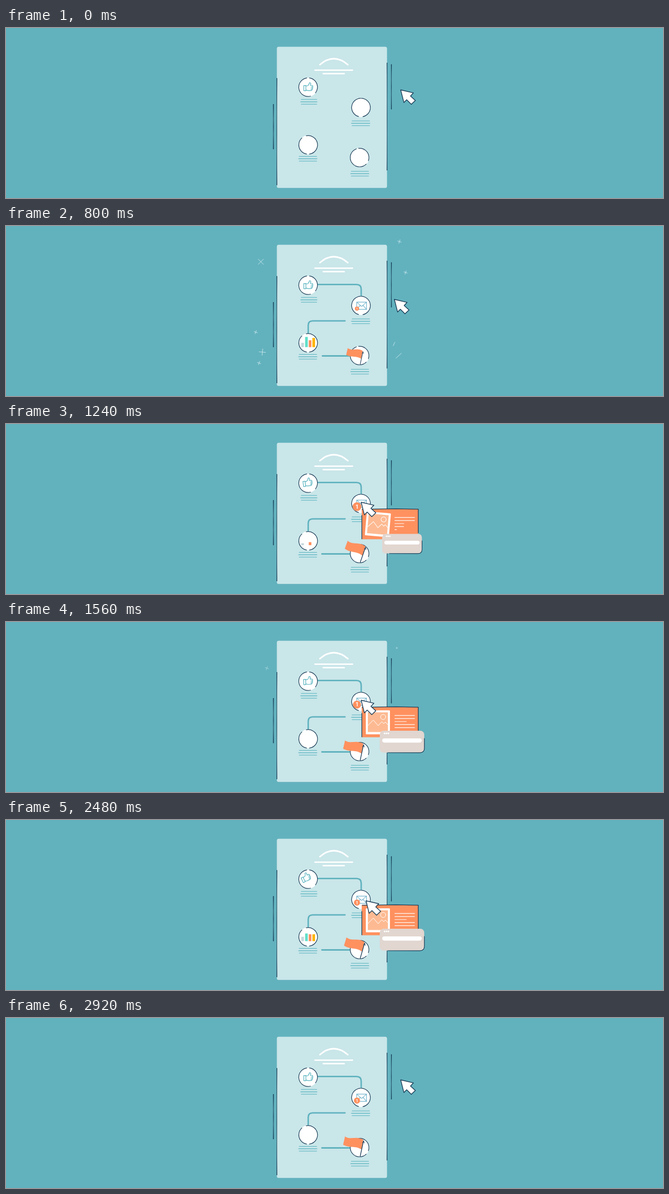
These frames come from a looping animation (1280x333 px, 3.32 s). An HTML page with a canvas:

```html
<!DOCTYPE html>
<html lang="en">
<head>
<meta charset="utf-8">
<title>Customer journey</title>
<style>
html, body { margin: 0; width: 100%; height: 100%; overflow: hidden; background: #62b2be; }
canvas { display: block; width: 100vw; height: 100vh; }
</style>
</head>
<body>
<canvas id="stage" width="1280" height="333"></canvas>
<script>
const canvas = document.getElementById('stage');
const ctx = canvas.getContext('2d');
const LOOP = 3320, STEP = 40, REST = 2920, CYCLE = 1240;
const BG = '#62b2be', PAPER = '#c9e6e9', NAVY = '#173a54', TEAL = '#52b0bd';
const ORANGE = '#ff915f', PEACH = '#fdba92', SAND = '#e1d6d0', WHITE = '#fff';

const clamp = v => Math.max(0, Math.min(1, v));
const prog = (t, start, dur) => clamp((t - start) / dur);
const smooth = p => p * p * (3 - 2 * p);
const easeOut = p => 1 - (1 - p) ** 3;
const backOut = p => p <= 0 ? 0 : 1 + 2.7 * (p - 1) ** 3 + 1.7 * (p - 1) ** 2;
const rad = deg => deg * Math.PI / 180;

// Smoothed interpolation through [time, value] pairs.
function keys(t, list) {
  if (t <= list[0][0]) return list[0][1];
  for (let i = 1; i < list.length; i++) {
    const [t0, v0] = list[i - 1], [t1, v1] = list[i];
    if (t < t1) return v0 + (v1 - v0) * smooth((t - t0) / (t1 - t0));
  }
  return list[list.length - 1][1];
}

function stroke(path, color, width) {
  ctx.strokeStyle = color;
  ctx.lineWidth = width;
  ctx.stroke(new Path2D(path));
}

function fill(path, color) {
  ctx.fillStyle = color;
  ctx.fill(new Path2D(path));
}

function box(x, y, w, h, r, color) {
  ctx.beginPath();
  ctx.roundRect(x, y, w, h, r);
  ctx.fillStyle = color;
  ctx.fill();
}

function disc(x, y, r, color) {
  ctx.beginPath();
  ctx.arc(x, y, r, 0, 7);
  ctx.fillStyle = color;
  ctx.fill();
}

// Runs draw() scaled and turned around a pivot.
function around(x, y, scale, deg, draw) {
  if (scale <= 0) return;
  ctx.save();
  ctx.translate(x, y);
  ctx.rotate(rad(deg));
  ctx.scale(scale, scale);
  ctx.translate(-x, -y);
  draw();
  ctx.restore();
}

function taper(x, y0, y1, w) {
  const mid = (y0 + y1) / 2;
  fill(`M${x - w / 2} ${y0}Q${x + w} ${mid} ${x - w / 2} ${y1}L${x + w / 2} ${y1}Q${x - w} ${mid} ${x + w / 2} ${y0}Z`, NAVY);
  stroke(`M${x} ${y0 + 1}V${y1 - 1}`, NAVY, w * .75);
}

// x, y, radius, angle, kind (2 = cross, 1 = dash), delay
const sparks = [
  [496.5, 70, 7.2, 45, 2, 0], [766.5, 30.5, 3.6, 20, 2, 0],
  [499.5, 247, 6.3, 5, 2, 80], [778.5, 91, 3.5, 20, 2, 140],
  [486.5, 208, 3.5, 20, 2, 140], [493, 268.5, 3.5, 20, 2, 180],
  [756, 231, 3.6, 115, 1, 140], [765, 254, 7, 138, 1, 100]
];

function drawSparks(t) {
  if (t >= REST) return;
  const u = t % CYCLE;
  for (const [x, y, r, angle, kind, delay] of sparks) {
    const p = prog(u, 280 + delay, 400);
    const fade = 1 - smooth(prog(u, 880 + delay / 2, 220));
    if (!p || !fade) continue;
    const back = 1 - easeOut(p);
    const side = x < 640 ? 1 : -1, upper = y < 170;
    const cx = x + side * (upper && x > 640 ? 7 : 16) * back;
    const cy = y + (upper ? 28 : -20) * back;
    const size = r * (.3 + .7 * (1 - back)) * (.4 + .6 * fade);
    ctx.globalAlpha = .75 * fade * clamp(p * 6);
    for (let i = 0; i < kind; i++) {
      const a = rad(angle - 35 * back + i * 90);
      const dx = size * Math.cos(a), dy = size * Math.sin(a);
      stroke(`M${cx - dx} ${cy - dy}L${cx + dx} ${cy + dy}`, '#e4f5f6', 1);
    }
  }
  ctx.globalAlpha = 1;
}

function drawPaper() {
  box(527.7, 36.8, 214.6, 276.5, 3.5, PAPER);
  taper(527.7, 98, 308, 1.2);
  taper(742.4, 68, 279, 1.2);
  taper(521, 149, 237.5, 1.2);
  taper(750.8, 71, 159.5, 1.2);
  stroke('M611.5 71.8Q638.5 48.5 666 71.8', WHITE, 3);
  stroke('M602 82.6H675', WHITE, 2.8);
  stroke('M618 89.4H659', WHITE, 2.6);
  for (const [x, y, w] of [[574, 140, 32], [673, 182, 36], [570, 251.5, 36], [671.5, 280.8, 35.5]])
    for (let i = 0; i < 3; i++) {
      const inset = i == 1 ? 0 : 1.2;
      stroke(`M${x + inset} ${y + i * 4.6}h${w - inset * 1.5}`, TEAL, 1.1);
    }
}

function drawLink(path, length, p) {
  if (!p) return;
  ctx.setLineDash([length * p, length + 5]);
  stroke(path, '#5fb2be', 2.8);
  ctx.setLineDash([]);
}

// x, y, then arcs of outline as from-to degrees
const spots = [
  [588.6, 115.9, 75, 262, -82, 38], [691.6, 155.8, 105, 268, -88, 78],
  [588.7, 228.9, 100, 228, -102, 82], [688.9, 253.8, 45, 250, -96, 20]
];

function drawSpots() {
  for (const [x, y, a, b, c, d] of spots) {
    disc(x, y, 18.6, WHITE);
    ctx.strokeStyle = NAVY;
    ctx.lineWidth = 1.2;
    for (const [from, to] of [[a, b], [c, d]]) {
      ctx.beginPath();
      ctx.arc(x, y, 18.2, rad(from), rad(to));
      ctx.stroke();
    }
  }
}

function drawThumb(t) {
  const deg = keys(t, [[900, 0], [1080, -28], [1330, 0], [1520, 0], [1740, -28], [1980, 0], [2220, 0], [2440, -28], [2660, 0]]);
  around(579.7, 124.8, 1, deg, () => {
    stroke('M580.2 112.6H584.3V122.8H580.2Z', TEAL, 1.2);
    stroke('M584.3 113.4L588 113C590 111.5 590.8 109.5 591 107.4Q593.6 106.8 593.8 109.4L593 112.5H596.6Q598.8 113.6 597.2 115.4Q598.6 117 596.8 118.2Q597.8 119.8 596.2 120.6Q596.4 122.6 594 122.6H588L584.3 121.4', TEAL, 1.2);
    stroke('M594.2 115.5H597M594 118.2H596.6M593.6 120.6H596', TEAL, 1);
  });
}

function drawMail(t) {
  around(692.5, 156, backOut(prog(t, 340, 160)), 0, () => {
    stroke('M683.3 149.2H702.4V163.3H683.3Z', '#70b3cb', 1.2);
    stroke('M683.3 149.2L692.8 157.6L702.4 149.2M683.3 163.3L690 155.4M702.4 163.3L695.6 155.4', '#70b3cb', 1.1);
  });
  const r = keys(t, [[700, 0], [860, 6], [1100, 6], [1240, 8.6], [1400, 6], [1480, 6], [1600, 8.5], [1780, 6]]);
  around(683.8, 161.8, r / 6, 0, () => {
    disc(683.8, 161.8, 6, ORANGE);
    ctx.fillStyle = WHITE;
    ctx.font = 'bold 7.5px Inter, Arial, sans-serif';
    ctx.textAlign = 'center';
    ctx.fillText('1', 683.6, 164.6);
  });
}

const bars = [[575.3, 8.5, '#c5d8dd', 120], [582.7, 20, '#62dfc9', 0], [589.8, 13.5, ORANGE, 120], [596.9, 18, '#ffb400', 0]];

function drawBars(t) {
  bars.forEach(([x, h, color, lag], i) => {
    const up = i * 40;
    const k = keys(t, [[460 + up, 0], [640 + up, 1], [1000 + lag, 1], [1220 + lag, 0],
      [1660 + up, 0], [1840 + up, 1], [2408 + lag, 1], [2628 + lag, 0]]);
    if (k > 0) box(x, 237.3 - h * k, 5.2, h * k, 0, color);
  });
}

function drawFlag(t) {
  const scale = smooth(prog(t, 610, 260));
  const deg = t < 830 || t >= REST ? 0 : 3.7 * (1 - Math.cos((t - 830) / 730 * 2 * Math.PI));
  around(690, 272, scale, deg, () => {
    fill('M660.5 232C672 240 682 230 696 238.5L692.5 257.5C680 249 671 256 656.8 248.2Z', ORANGE);
    stroke('M690 271L696.4 241', NAVY, 1.3);
    stroke('M694.8 244.5L696.8 240.5L698 245', NAVY, 1);
  });
}

function drawPanel(t) {
  const scale = easeOut(prog(t, 1040, 160)) * (1 - smooth(prog(t, 2520, 240)));
  around(693, 167, scale, 0, () => {
    box(693, 166.8, 110, 59, 0, ORANGE);
    stroke('M694 166.9L760 166.2L803.2 166.8V213M693.3 179V225', NAVY, 1.3);
    const widths = [39, 39, 23, 39, 39];
    widths.forEach((w, i) => {
      const p = prog(t, 1104 + i * 32, 96 - i * 2);
      if (p) stroke(`M757.5 ${183.2 + i * 5.9}h${(w - .5) * p}`, WHITE, 1.2);
    });
    const tilt = keys(t, [[1080, 24], [1240, 5], [1340, 0]]);
    around(724.5, 196.5, 1, tilt, () => {
      box(701, 173, 47, 47, 1.5, WHITE);
      box(705, 177, 39, 38.5, 0, PEACH);
      stroke('M705 203L715.5 192L725 203L732 195.5L736 199L739 196L744 201', WHITE, 1);
      ctx.beginPath();
      ctx.arc(734.8, 186, 5, 0, 7);
      ctx.stroke();
    });
  });
}

function drawSearch(t) {
  const scale = backOut(prog(t, 1170, 240)) * (1 - smooth(prog(t, 2500, 220)));
  around(771.5, 234.5, scale, 0, () => {
    box(728.2, 213, 86.6, 42.8, 7.5, SAND);
    stroke('M744 256L806 256.2Q815.2 256 815.2 247V228', NAVY, 1.2);
    for (let i = 0; i < 3; i++) disc(737.6 + i * 3.7, 218.2, 1.6, WHITE);
    box(733, 228, 77, 8.2, 4.1, WHITE);
  });
}

function drawCursor(t) {
  const k = smooth(prog(t, 680, 400)) - smooth(prog(t, 2400, 400));
  const curve = (a, b, c, d) => {
    const q = 1 - k;
    return q * q * q * a + 3 * q * q * k * b + 3 * q * k * k * c + k * k * k * d;
  };
  ctx.save();
  ctx.translate(curve(769, 753, 722, 692), curve(121.3, 163, 172, 153.3));
  const arrow = 'M0 0L24.8 5.8L19 12L28.5 20.6L20.6 28.2L11.6 19.2L6.2 24.6Z';
  fill(arrow, WHITE);
  stroke(arrow, NAVY, 1.4);
  ctx.restore();
}

function render(t) {
  ctx.setTransform(1, 0, 0, 1, 0, 0);
  ctx.fillStyle = BG;
  ctx.fillRect(0, 0, 1280, 333);
  ctx.lineCap = ctx.lineJoin = 'round';
  drawSparks(t);
  drawPaper();
  drawLink('M607 114.7H683Q692 114.7 692 123.7V137', 104, smooth(prog(t, 180, 200)));
  drawLink('M660.5 185.8H597.5Q588.8 185.8 588.8 194.5V210', 93, smooth(prog(t, 380, 200)));
  drawLink(`M${617.5 - 2 * prog(t, 760, 80)} 254.5H671`, 56, smooth(prog(t, 560, 180)));
  drawSpots();
  drawThumb(t);
  drawMail(t);
  drawBars(t);
  drawFlag(t);
  drawPanel(t);
  drawSearch(t);
  drawCursor(t);
}

const start = performance.now();
function tick() {
  const t = (performance.now() - start) % LOOP;
  render(t < 200 ? 0 : Math.floor(t / STEP) * STEP);
  requestAnimationFrame(tick);
}
tick();
</script>
</body>
</html>
```
